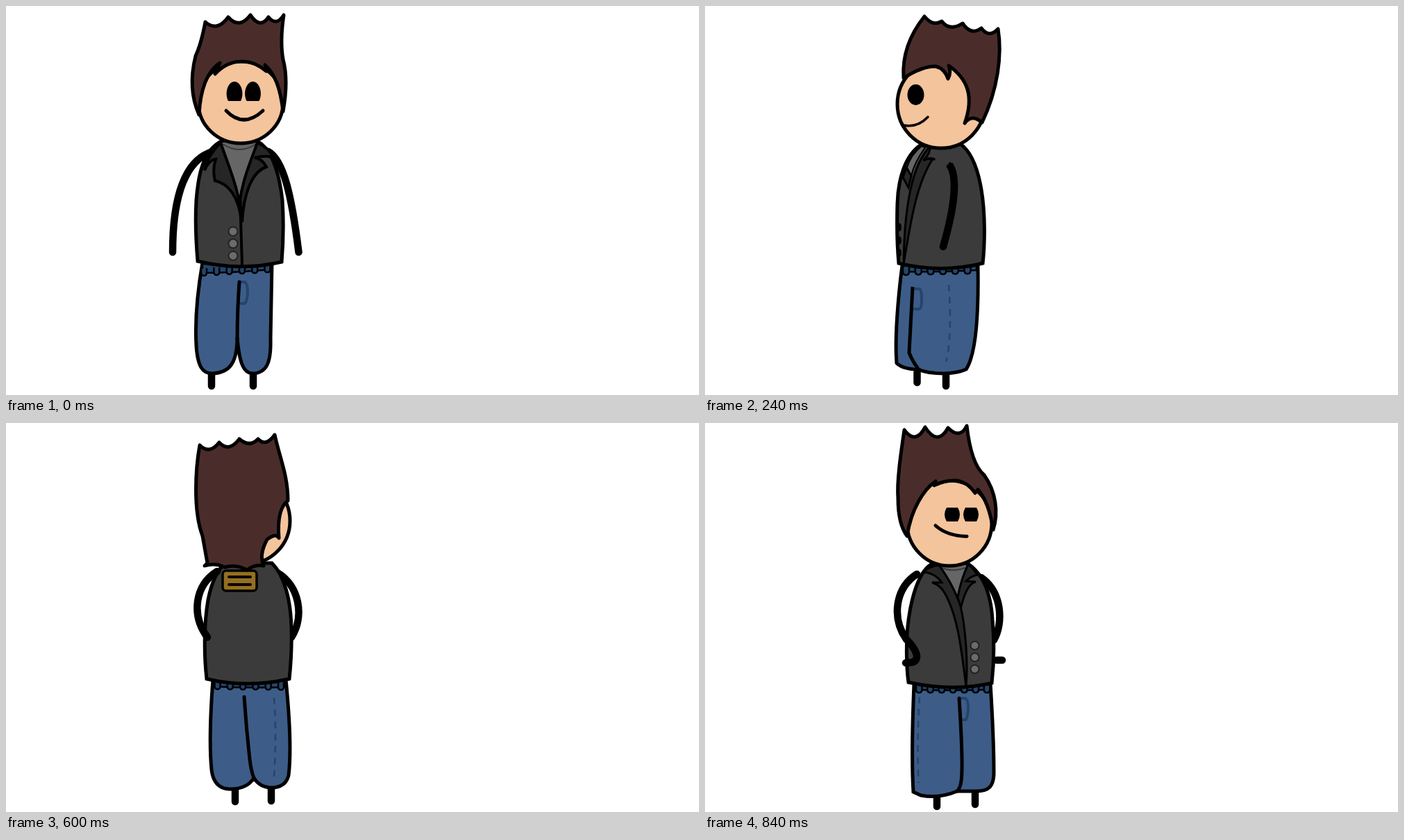
Write an HTML page that moves like this. It is 998x561 px and loops after 0.96 s.

```html
<!DOCTYPE html>
<html lang="en">
<head>
<meta charset="utf-8">
<title>Turnaround</title>
<style>
  html, body { margin: 0; width: 100%; height: 100%; overflow: hidden; background: #fff; }
  svg { display: block; width: 100%; height: 100%; }
</style>
</head>
<body>
<svg id="stage" viewBox="0 0 998 561" stroke-linecap="round" stroke-linejoin="miter" stroke-miterlimit="3"></svg>
<script>
const STEP = 120;
const SKIN = '#f4c49c', HAIR = '#4a2d2a', COAT = '#3b3b3b', LAPEL = '#262626',
      SHIRT = '#666', DENIM = '#3d5d88', NAVY = '#24456b', GOLD = '#956f20';

const shape = (d, fill, w = 5, join = 'miter') =>
  `<path d="${d}" fill="${fill}" stroke="#000" stroke-width="${w}" stroke-linejoin="${join}"/>`;
const line = (d, w = 5, color = '#000', extra = '') =>
  `<path d="${d}" fill="none" stroke="${color}" stroke-width="${w}" ${extra}/>`;
const oval = (x, y, rx, ry, fill, w = 0, color = '#000') =>
  `<ellipse cx="${x}" cy="${y}" rx="${rx}" ry="${ry}" fill="${fill}" stroke="${color}" stroke-width="${w}"/>`;
const hair = d => shape(d, HAIR, 5, 'round');
const limb = d => line(d, 10.5);
const leg = (x, y0, y1) => limb(`M${x},${y0}V${y1}`);
const seam = d => line(d, 2.5, NAVY, 'stroke-dasharray="9.5 8" stroke-linecap="butt"');
const fly = d => line(d, 4, NAVY);
const buttons = (x, y, gap, r) =>
  [0, 1, 2].map(i => oval(x, y + i * gap, r, r, '#6b6b6b', 2, '#222')).join('');

// Waistband from x0 to x1 with hanging loops
function belt(x0, x1, top, yl, yr, first, gap, count, w, drop) {
  let s = shape(`M${x0},${top}H${x1}V${yr}Q${(x0 + x1) / 2},${(yl + yr) / 2 + 2} ${x0},${yl}Z`, NAVY, 2.5);
  for (let i = 0; i < count; i++) {
    const x = first + i * gap, y = yl + (yr - yl) * (x - x0) / (x1 - x0) - 6;
    s += shape(`M${x - w},${y}v${drop}q0,5 ${w},5q${w},0 ${w},-5v${-drop}`, NAVY, 2.5);
  }
  return s;
}

const label = (x, y, w) =>
  `<rect x="${x}" y="${y}" width="${w}" height="29" rx="5" fill="${GOLD}" stroke="#000" stroke-width="3.5"/>` +
  line(`M${x + 9},${y + 9}h${w - 18}M${x + 9},${y + 20}h${w - 18}`, 4);

const front = [
  leg(296, 530, 548), leg(356, 530, 548),
  shape('M283,370C276,410 272,455 274,490C276,520 283,530 297,530C322,529 333,515 333,478C336,515 342,530 356,530C375,529 382,515 381,480L383,370Z', DENIM),
  fly('M338,398H344Q348,400 348,413Q347,428 343,429H338'),
  line('M336,398Q333,440 333,480'),
  belt(283, 381, 372, 385, 380, 285, 18.3, 6, 4, 5),
  shape('M310,195C285,208 277,240 274,280C272,315 274,345 276,368Q337,383 397,369C399,345 400,310 398,280C394,245 385,208 362,195Z', COAT),
  limb('M297,210C260,222 240,270 240,355'), limb('M378,210C399,222 411,270 421.5,355'),
  shape('M309,196H362C352,225 340,255 338,290C330,255 318,225 309,196Z', SHIRT, 2),
  line('M312,199Q336,215 360,199', 2, '#3a3a3a'),
  shape('M309,197C300,206 288,222 286,237Q292,222 302,221Q297,236 301,252C320,256 336,275 339,312C338,270 322,235 309,197Z', LAPEL, 4),
  shape('M362,197C372,202 383,210 383,218Q372,215 358,219Q369,220 375,232C352,240 342,275 340,312L337,280C341,250 352,225 362,197Z', LAPEL, 4),
  line('M337,275L340,373', 4),
  buttons(327, 325, 17.6, 6.5),
  oval(338, 139, 61, 59, SKIN, 5),
  hair('M287,23Q304,38 320,16Q336,34 352,13Q366,34 378,16Q389,30 400,13C396,40 396,60 399,77C406,103 403,130 399,152C395,117 387,98 373,85L375,94Q357,79 339,80Q318,80 301,98L308,82Q281,100 278,157C266,130 266,100 273,72Q281,55 287,23Z'),
  ...[329, 355.5].map(x => `<path d="M${x - 9},137C${x - 15},125 ${x - 9},109 ${x},109C${x + 9},109 ${x + 15},125 ${x + 9},137Z"/>`),
  line('M317,151Q342,177 370,151')
];

const quarter = [
  leg(298, 528, 546), leg(353, 534, 549),
  shape('M276,372C273,420 271,470 271,500C271,520 278,527 297,527H324Q350,538 376,533L387,528C390,480 388,420 386,372Z', DENIM),
  fly('M319,393H312Q308,395 308,408Q309,423 312,424H316'),
  line('M321,393C318,440 315,490 318,512Q319,522 324,527'),
  seam('M378,391Q382,450 379.5,515'),
  belt(278, 384, 373, 380.5, 380.5, 281, 16.3, 7, 4.3, 5.5),
  limb('M289,219C259,240 257,285 271,309'), limb('M259,338H267'),
  shape('M308,199C285,215 275,245 273,280C270,315 271,345 274,371Q330,384 394,370C397,350 398,310 394,280C390,250 380,210 360,199Z', COAT),
  shape('M309,200H351L322,250Z', SHIRT, 2),
  line('M312,205Q331,212 348,204', 2, '#3a3a3a'),
  shape('M308,200Q299,208 295,215Q304,217 311,224L297,225Q310,227 319,264L323,247Q318,220 308,200Z', LAPEL, 3),
  shape('M350,201Q363,202 373,211Q356,212 346,226L360,226Q349,229 342,241C322,275 317,330 311,376C308,340 312,290 319,260Q329,230 350,201Z', LAPEL, 3),
  buttons(298.5, 317, 17, 6),
  limb('M382,214C414,235 418,278 397,308C380,325 378,338 388,341L398,342'),
  oval(335, 140.5, 61, 61.5, SKIN, 5),
  hair('M310,0Q320,20 337,3Q352,30 370,2Q384,28 400,6C405,40 411,80 409,105C409,130 405,147 396,159C390,120 372,92 355,80L357,86Q341,78 325,79Q309,81 298,97L294,92Q278,110 272,150C264,125 268,95 285,71C298,60 306,35 310,0Z'),
  ...[304, 331].map(x => `<path d="M${x - 8},118h16q6,10 0,20h-16q-6,-10 0,-20Z"/>`),
  line('M310,159.5Q338,159 355,144')
];

const side = [
  leg(305.5, 524, 543), leg(347, 530, 548),
  shape('M284,374C278,420 273,480 276,515Q285,524 307,524Q320,530 345,530Q365,529 376,524C392,500 394,430 393,374Z', DENIM),
  fly('M300,408H309Q312,410 312,423Q312,436 309,437H300'),
  line('M299,405L294,500Q299,513 307,523', 5, '#000', 'stroke-linecap="butt"'),
  seam('M351,402C354,440 354,490 347,513'),
  belt(286, 391, 374, 383, 381, 289.5, 17.7, 6, 4.5, 6),
  shape('M311,200C288,215 278,250 277,285C276,320 277,350 279,371Q340,386 400,371C403,345 404,300 398,265C393,235 383,210 368,199Z', COAT),
  shape('M312,202Q296,215 291,233L297,245Q301,226 317,204Z', SHIRT, 2),
  shape('M290,233L285,247L293,262L297,245Z', LAPEL, 3),
  shape('M323,204C298,230 287,290 286,372C296,315 303,260 327,222Q322,219 314,222Q322,217 324,206Z', LAPEL, 3),
  line('M316,222Q322,218 330,221', 3.5),
  ...[319, 338, 356].map(y => oval(280, y, 3, 6, '#000')),
  line('M352,229C364,245 360,288 343,347', 10.5, '#000', 'stroke-linecap="butt"'),
  oval(343, 347, 5.3, 5.3, '#000'), shape('M348,231L353,225L357,230Z', '#000', 1),
  oval(340, 141.5, 63, 63.5, SKIN, 5),
  hair('M316,15Q328,30 341,22Q352,37 371,25Q383,43 398,32Q409,47 422,33C428,70 422,120 399,168Q384,155 374,169C388,130 378,105 351,86Q355,95 350,105Q345,90 332,87Q312,87 286,104C284,75 292,45 316,15Z'),
  oval(303.5, 128, 12, 15, '#000'),
  line('M286,172Q306,176 321,160', 3.5)
];

const backQuarter = [
  leg(305, 527, 545), leg(357, 528, 546),
  shape('M284,370C279,420 276,475 280,508Q284,526 306,526Q322,525 330,512Q340,528 365,528Q388,527 391,500C395,460 392,410 389,370Z', DENIM),
  line('M344,395Q341,440 336,485Q334,502 330,512'), seam('M301,396Q297,450 301,510'),
  belt(286, 387, 372, 381, 380, 291, 18.3, 6, 4, 5),
  limb('M296,216C264,235 257,280 276,309'),
  shape('M304,202C286,220 277,255 276,295C275,330 277,350 279,369Q340,383 398,369C402,335 402,290 396,255C391,230 383,212 371,202Z', COAT),
  label(326, 213, 49),
  limb('M383,214C416,235 420,278 397,309'),
  oval(339, 141, 61, 62, SKIN, 5),
  hair('M300,17Q313,35 324,23Q336,36 351,23Q366,43 380,28Q394,46 408,32C414,65 418,125 404,163L397,202L401,206Q386,201 372,208Q356,203 340,212Q328,203 316,206Q323,190 311,168Q298,158 294,166C296,140 292,120 281,112C281,75 293,50 300,17Z')
];

const back = [
  leg(312, 526, 543), leg(372, 526, 543),
  shape('M288,368V470C289,510 296,526 313,527C330,526 337,505 337,473C339,505 346,527 373,527C391,525 397,500 396,460C397,430 393,400 389,366Z', DENIM),
  line('M334,395L337,475'),
  belt(289, 387, 369, 378, 381, 292, 18.7, 6, 4, 4.5),
  limb('M296,212C248,258 207,254 185.5,167'), limb('M383,212C428,258 471,254 493,167'),
  shape('M298,204C285,225 278,260 277,300C276,330 278,350 279,366Q340,381 400,366C403,330 402,290 396,255C391,230 385,215 378,204Z', COAT),
  label(314, 213.5, 54),
  hair('M282,20Q294,40 304,24Q317,36 330,21Q346,42 362,24Q380,46 395,30Q398,52 409,78C416,110 415,135 406,162C402,175 399,190 397,202L401,206Q390,200 373,207Q355,204 337,213Q320,203 307,207Q296,198 283,212Q290,200 287,175Q278,150 279,135C279,105 281,90 284,80Q287,50 282,20Z')
];

const flip = dy => `transform="matrix(-1 0 0 1 687 ${dy})"`;
const poses = [
  [front], [quarter], [side], [backQuarter], [back],
  [backQuarter, flip(0)], [side, flip(-1.5)], [quarter, flip(4)]
];

const stage = document.getElementById('stage');
stage.innerHTML = poses.map(([parts, move = '']) => `<g ${move}>${parts.join('')}</g>`).join('');
const groups = [...stage.children];

function draw(ms) {
  const now = Math.floor(ms / STEP) % groups.length;
  groups.forEach((g, i) => g.setAttribute('display', i === now ? 'inline' : 'none'));
}

let start;
function tick(t) {
  start ??= t;
  draw(t - start);
  requestAnimationFrame(tick);
}
draw(0);
requestAnimationFrame(tick);
</script>
</body>
</html>
```
